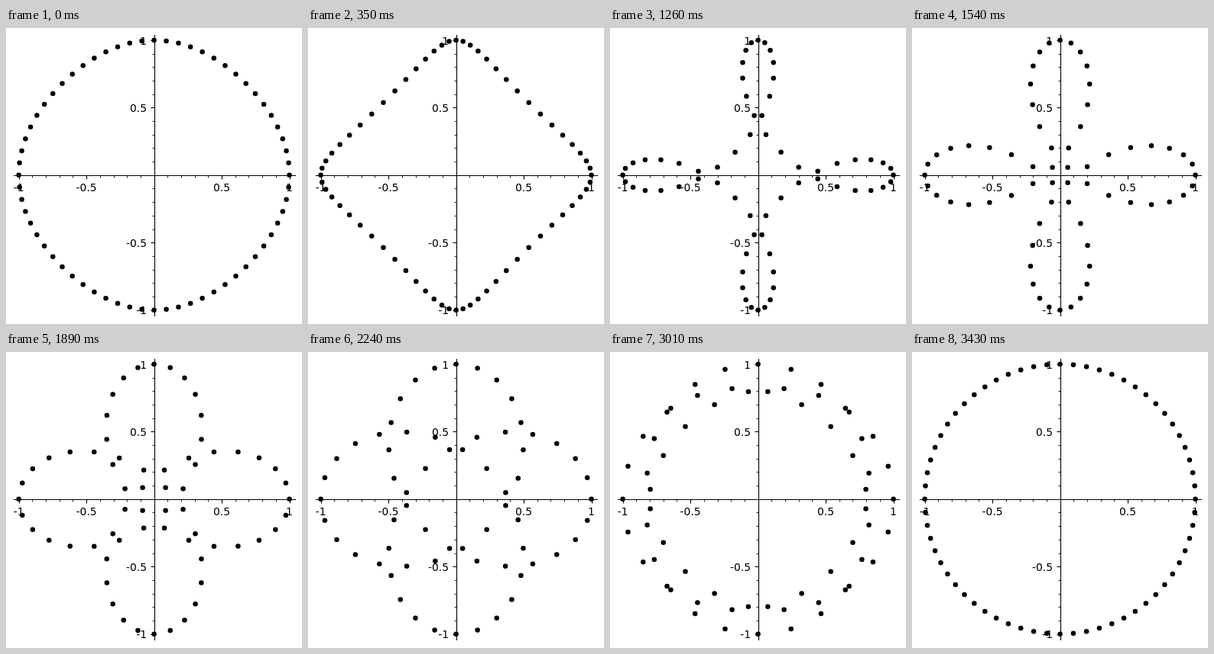
Animation of 387x388 px, one loop 3.5 s. Source, as an HTML page with a canvas:

```html
<!DOCTYPE html>
<html lang="en">
<head>
<meta charset="utf-8">
<title>Hypotrochoid points</title>
<style>
  html, body { margin: 0; width: 100%; height: 100%; overflow: hidden; background: #fff; }
  canvas { display: block; }
</style>
</head>
<body>
<canvas id="stage" width="387" height="388"></canvas>
<script>
const ctx = document.getElementById('stage').getContext('2d');
const CX = 193.6, CY = 192.8, UNIT = 176.9;
const EXTENT = 1.04, DOTS = 64, RADIUS = 3.25;
const STEPS = 50, STEP_MS = 70;

const px = x => CX + x * UNIT;
const py = y => CY - y * UNIT;
const snap = v => Math.floor(v + 0.5) + 0.5;

function line(x1, y1, x2, y2, width) {
  ctx.lineWidth = width;
  ctx.beginPath();
  ctx.moveTo(x1, y1);
  ctx.lineTo(x2, y2);
  ctx.stroke();
}

function drawAxes() {
  const ax = snap(CX), ay = snap(CY);
  ctx.lineCap = 'square';
  line(snap(px(-EXTENT)), ay, snap(px(EXTENT)), ay, 1.11);
  line(ax, snap(py(EXTENT)), ax, snap(py(-EXTENT)), 1.11);

  ctx.lineCap = 'butt';
  for (let i = -10; i <= 10; i++) {
    if (i === 0) continue;
    const major = i % 5 === 0;
    const len = major ? 5 : 3, width = major ? 1.11 : 0.83;
    const x = snap(px(i / 10)), y = snap(py(i / 10));
    line(x, ay, x, ay + len, width);
    line(ax, y, ax - len, y, width);
  }

  ctx.font = '13.89px "DejaVu Sans", sans-serif';
  ctx.textBaseline = 'alphabetic';
  for (const v of [-1, -0.5, 0.5, 1]) {
    ctx.textAlign = 'center';
    ctx.fillText(v, px(v), 214);
    ctx.textAlign = 'right';
    ctx.fillText(v, 184, Math.round(py(v) + 5.6));
  }
}

// Blend of a forward turn and a triple-speed backward turn.
function drawDots(mix) {
  for (let i = 0; i < DOTS; i++) {
    const a = i / DOTS * 2 * Math.PI;
    const x = (1 - mix) * Math.cos(a) + mix * Math.cos(3 * a);
    const y = (1 - mix) * Math.sin(a) - mix * Math.sin(3 * a);
    ctx.beginPath();
    ctx.arc(px(x), py(y), RADIUS, 0, 2 * Math.PI);
    ctx.fill();
  }
}

const start = performance.now();

function draw() {
  const elapsed = Math.max(0, performance.now() - start);
  const step = Math.floor(elapsed / STEP_MS) % STEPS;
  ctx.fillStyle = '#fff';
  ctx.fillRect(0, 0, 387, 388);
  ctx.fillStyle = ctx.strokeStyle = '#000';
  drawAxes();
  drawDots((step + 1) / STEPS);
  requestAnimationFrame(draw);
}
draw();
</script>
</body>
</html>
```
